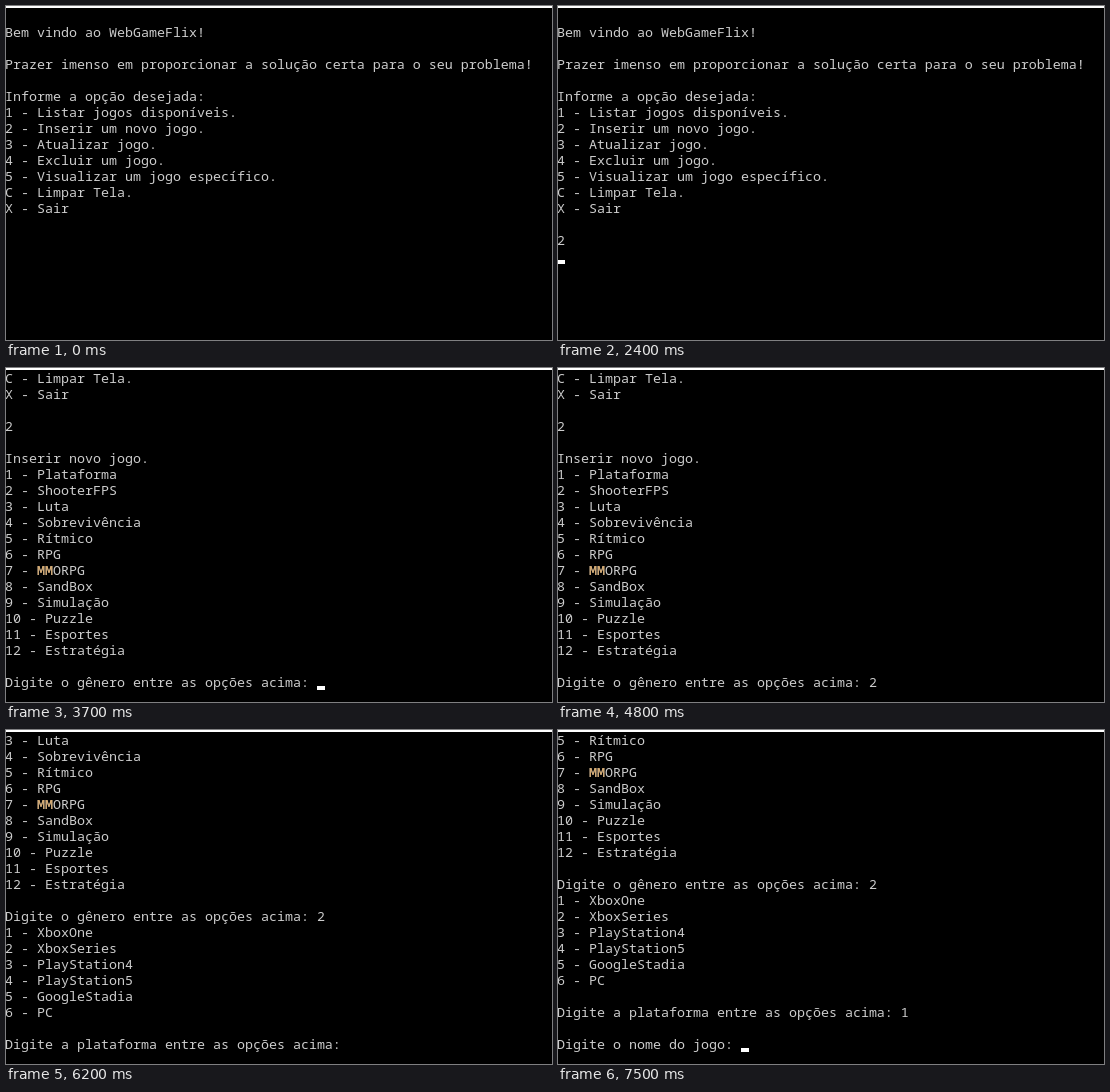
Write an HTML page with a canvas that moves like this. It is 546x334 px and loops after 8000 ms.

```html
<!DOCTYPE html>
<html lang="pt">
<head>
<meta charset="utf-8">
<title>Console</title>
<style>
html, body { margin: 0; width: 100%; height: 100%; overflow: hidden; background: #000; }
canvas { display: block; }
</style>
</head>
<body>
<canvas id="stage" width="546" height="334"></canvas>
<script>
const ctx = document.getElementById('stage').getContext('2d');
const LOOP = 8000, ROWS = 20, CHAR = 8, LINE = 16, LEFT = -1;

const menu = `
Bem vindo ao WebGameFlix!

Prazer imenso em proporcionar a solução certa para o seu problema!

Informe a opção desejada:
1 - Listar jogos disponíveis.
2 - Inserir um novo jogo.
3 - Atualizar jogo.
4 - Excluir um jogo.
5 - Visualizar um jogo específico.
C - Limpar Tela.
X - Sair

`;
const genres = `
Inserir novo jogo.
1 - Plataforma
2 - ShooterFPS
3 - Luta
4 - Sobrevivência
5 - Rítmico
6 - RPG
7 - MMORPG
8 - SandBox
9 - Simulação
10 - Puzzle
11 - Esportes
12 - Estratégia

Digite o gênero entre as opções acima: `;
const platforms = `
1 - XboxOne
2 - XboxSeries
3 - PlayStation4
4 - PlayStation5
5 - GoogleStadia
6 - PC

Digite a plataforma entre as opções acima: `;

// [time in ms, cursor visible, text printed]
const events = [
  [0, false, menu],
  [1000, true, ''], [1300, false, ''], [1700, true, ''],
  [2200, true, '2'], [2400, true, '\n'], [2500, true, genres],
  [3200, false, ''], [3700, true, ''],
  [4300, true, '2'], [4800, false, ''], [5300, true, platforms],
  [6200, false, ''], [6700, true, ''],
  [6800, true, '1'], [7200, false, ''], [7500, true, '\n\nDigite o nome do jogo: ']
];

function draw(now) {
  const t = now % LOOP;
  const past = events.filter(e => e[0] <= t);
  const lines = past.map(e => e[2]).join('').split('\n').slice(-ROWS);

  ctx.fillStyle = '#000';
  ctx.fillRect(0, 0, 546, 334);
  ctx.font = '13.333px "Noto Sans Mono", "DejaVu Sans Mono", monospace';
  lines.forEach((line, i) => {
    const y = (i + 1) * LINE - 1;
    ctx.fillStyle = '#ccc';
    ctx.fillText(line, LEFT, y);
    const m = line.indexOf('MM');
    if (m >= 0) {
      ctx.fillStyle = '#d8a868';
      ctx.fillText('MM', LEFT + m * CHAR, y);
    }
  });

  ctx.fillStyle = '#fff';
  ctx.fillRect(0, 0, 546, 2);
  if (past[past.length - 1][1]) {
    const col = lines[lines.length - 1].length;
    ctx.fillRect(LEFT + col * CHAR, lines.length * LINE - 2, CHAR, 4);
  }
}

function tick() {
  draw(performance.now());
  requestAnimationFrame(tick);
}
tick();
</script>
</body>
</html>
```
